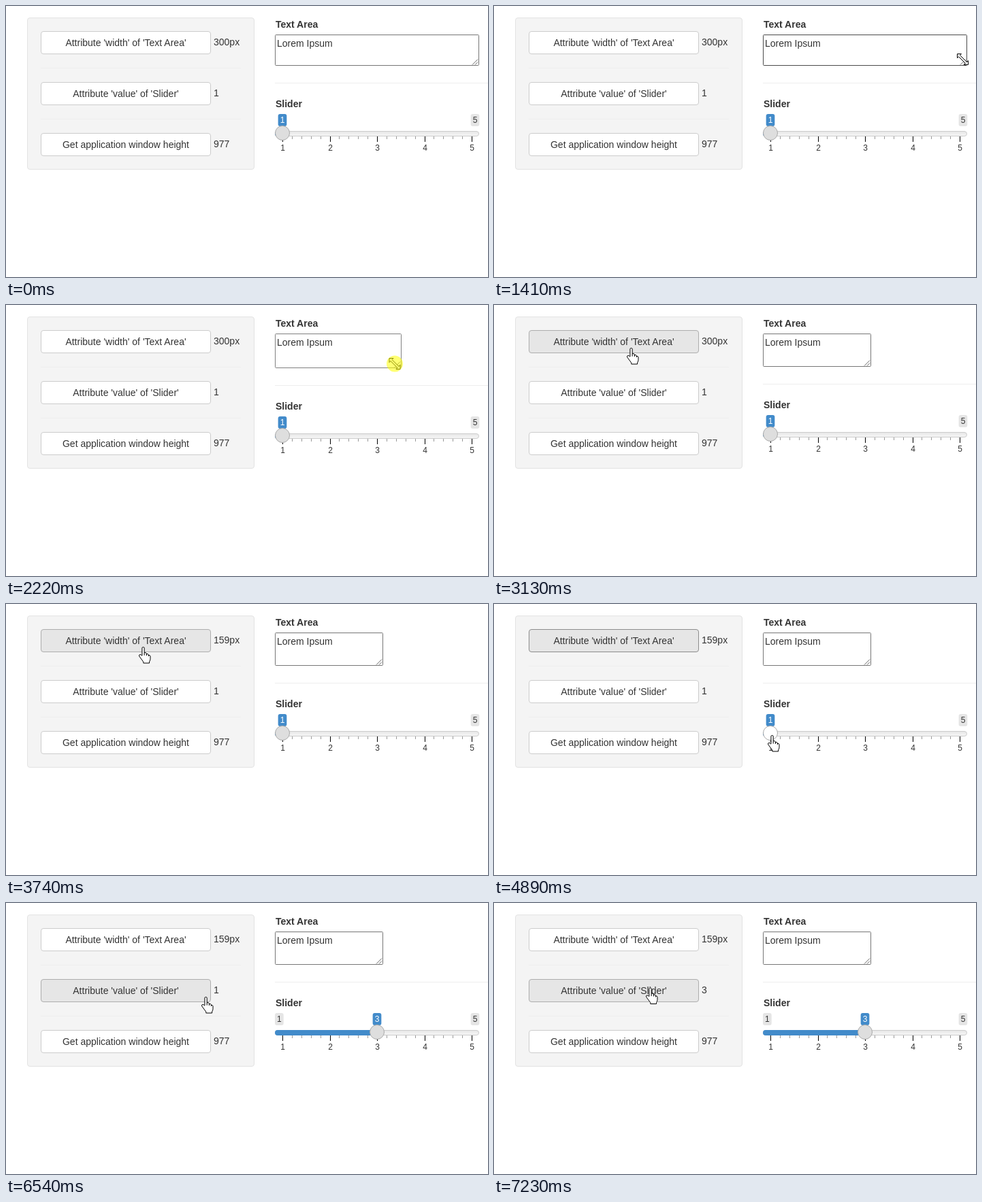
Recreate the animation shown at these times as an HTML page. Size 708x399 px, loop 8 s.

```html
<!DOCTYPE html>
<html lang="en">
<head>
<meta charset="utf-8">
<title>Attribute demo</title>
<style>
html, body { margin: 0; width: 100%; height: 100%; overflow: hidden; background: #fff; }
svg { display: block; width: 708px; height: 399px; }
text { font: 14px "Liberation Sans", Arial, sans-serif; fill: #333; }
.bold { font-weight: bold; }
.small { font-size: 12px; }
.mid { text-anchor: middle; }
.cursor { fill: #fff; stroke: #000; stroke-linejoin: round; }
</style>
</head>
<body>
<svg id="stage" viewBox="0 0 708 399">
  <defs>
    <linearGradient id="track" x1="0" y1="-.5" x2="0" y2="1.5">
      <stop offset="0" stop-color="#dedede"/><stop offset="1" stop-color="#fff"/>
    </linearGradient>
  </defs>
  <rect width="708" height="399" fill="#fff"/>
  <rect x="31.5" y="17.5" width="333" height="223" rx="3.5" fill="#f4f4f4" stroke="#e3e3e3"/>
  <path d="M51 91.5H345M51 166.5H345" stroke="#eee"/>
  <g id="buttons"></g>

  <text class="bold" x="396" y="32">Text Area</text>
  <rect id="area" x="395.5" y="42.5" rx="1" fill="#fff"/>
  <text x="398" y="60">Lorem Ipsum</text>
  <path id="grip" d="M-10 -1.5L-2 -9.5M-6 -1.5L-2 -5.5" stroke="#666"/>

  <g id="lower">
    <path d="M395 113.5H708" stroke="#eee"/>
    <text class="bold" x="396" y="149">Slider</text>
    <g id="grid"></g>
    <rect x="395.5" y="184.5" width="299" height="7" rx="3.5" fill="url(#track)" stroke="#ccc"/>
    <rect id="bar" x="395" y="184" height="8" rx="4" fill="#428bca"/>
    <g id="low"><rect x="395" y="159" width="12.7" height="18" rx="3" fill="#e5e5e5"/>
      <text class="small mid" x="401.4" y="172">1</text></g>
    <rect x="682.6" y="159" width="12.7" height="18" rx="3" fill="#e5e5e5"/>
    <text class="small mid" x="689" y="172">5</text>
    <g id="thumb">
      <rect x="-6.35" y="159" width="12.7" height="18" rx="3" fill="#428bca"/>
      <text id="count" class="small mid" y="172" style="fill:#fff"></text>
      <circle id="knob" cy="187" r="10.5" stroke="#ababab"/>
    </g>
  </g>

  <g id="pointer">
    <path id="arrow" class="cursor" d="M.5 .5V17L4.3 13.4L6.8 18.7L9.2 17.6L6.8 12.4H12Z"/>
    <path id="beam" fill="none" stroke="#000" d="M-3.5 -7.5H-1L0 -6.5L1 -7.5H3.5M0 -6.5V6.5M-3.5 7.5H-1L0 6.5L1 7.5H3.5"/>
    <path id="resize" class="cursor" d="M-8 -8H-2L-4 -6L6 4L8 2V8H2L4 6L-6 -4L-8 -2Z"/>
    <g id="hand" class="cursor">
      <path d="M-1.6 13V2.1a1.65 1.65 0 0 1 3.3 0V8.6q2.6 -.6 3.2 1.4V10.6q2.6 -.8 3 1.2v.6q2.3 -.4 2.6 1.5v4q0 2 -1.4 4v2.1h-8.8v-1.8l-6 -8.2q-1.2 -2.2 1.2 -2.6q1.3 0 2.7 1.7z"/>
      <path d="M1.7 8.6v4M4.9 10v3M7.9 11.8v2.2" fill="none"/>
    </g>
    <circle id="glow" r="12" fill="#ff0" fill-opacity=".55"/>
  </g>
</svg>
<script>
const LOOP = 8000;
const $ = id => document.getElementById(id);
const set = (el, attrs) => { for (const k in attrs) el.setAttribute(k, attrs[k]); };
const show = (id, on) => set($(id), { visibility: on ? "inherit" : "hidden" });
const within = (t, a, b) => t >= a && t < b;

const tops = [37, 112, 187];
const captions = ["Attribute 'width' of 'Text Area'", "Attribute 'value' of 'Slider'", "Get application window height"];
$("buttons").innerHTML = captions.map((s, i) => `
  <rect id="btn${i}" x="51.5" y="${tops[i] + .5}" width="249" height="33" rx="3.5"/>
  <text class="mid" x="176" y="${tops[i] + 22}">${s}</text>
  <text id="val${i}" x="305" y="${tops[i] + 21}"></text>`).join("");

let marks = "";
for (let i = 0; i <= 20; i++) {
  const x = Math.round(406 + i * 13.9) + .5, major = i % 5 === 0;
  marks += `<path d="M${x} 192v${major ? 8 : 4}" stroke="${major ? "#000" : "#999"}"/>`;
  if (major) marks += `<text class="small mid" x="${x + .2}" y="213">${1 + i / 5}</text>`;
}
$("grid").innerHTML = marks;

// start, end, steps, target x, y, optional control point
const legs = [
  [70, 610, 8, 695.5, 71, 706, 170],
  [780, 930, 3, 695.5, 67],
  [1080, 1170, 2, 692, 61],
  [1320, 1410, 2, 688.5, 78.5],
  [1560, 1650, 2, 692, 81.5],
  [1810, 2440, 9, 551, 84.5],
  [2590, 3130, 8, 201.5, 63, 400, -15],
  [4290, 4890, 9, 408.5, 193, 455, 120],
  [5060, 5440, 6, 552, 190],
  [5680, 5760, 2, 552.5, 193],
  [6160, 6620, 7, 229.5, 124.5]
];
const presses = [[1810, 2590], [3600, 3740], [5060, 5680], [7080, 7230]];

const tick = (t, a, b, n) =>
  t < a ? 0 : Math.min(n, Math.floor((t - a) / (b - a) * (n - 1) + .01) + 1);
const smooth = p => p * p * (3 - 2 * p);
const quad = (a, c, b, p) => a * (1 - p) ** 2 + 2 * c * p * (1 - p) + b * p * p;
const easeOut = p => 1 - (1 - p) ** 2;
const sag = e => 3 * e + 2.4 * Math.sin(Math.PI * e ** 4);

function cursorAt(t) {
  let x = 706, y = 273;
  for (const [a, b, n, X, Y, cx = (x + X) / 2, cy = (y + Y) / 2] of legs) {
    if (t < a) break;
    const p = smooth(tick(t, a, b, n) / n);
    [x, y] = [quad(x, cx, X, p), quad(y, cy, Y, p)];
  }
  return [x, y];
}

function draw(t) {
  let [x, y] = cursorAt(t);
  const pressed = presses.some(([a, b]) => within(t, a, b));
  const sizing = within(t, 1810, 2590), sliding = within(t, 5060, 5680);

  // the box trails the pointer slightly while being resized
  const p = Math.max(0, (tick(t, 1810, 2440, 9) - 1) / 8);
  if (sizing) {
    const e = easeOut(p);
    x = 692 - 141 * e;
    y = 81.5 + sag(e);
  }
  const lag = p === 1 ? 1 : easeOut(Math.max(0, p - .06));
  const right = Math.round(695 - 141 * lag), shift = Math.round(sag(lag));
  const bottom = 88 + shift;

  const value = t < 5060 ? 1 : t >= 5440 ? 3 : 1 + Math.round((x - 408.5) / 69.5);
  const knobX = 406 + (value - 1) * 69.5;

  const visible = t >= 70;
  const overArea = visible && x >= 395 && x <= right + 1 && y >= 42 && y <= bottom;
  const overGrip = sizing || overArea && x > right - 16 && y > bottom - 16;
  const overKnob = sliding || Math.hypot(x - knobX, y - 187 - shift) < 11;
  const overBtn = tops.findIndex(top => visible && x >= 51 && x <= 301 && y >= top && y <= top + 34);
  const focus = within(t, 3600, 5060) ? 0 : t >= 7080 ? 1 : -1;

  const values = [t < 3670 ? "300px" : "159px", t < 7155 ? "1" : "3", "977"];
  values.forEach((v, i) => {
    const hover = overBtn === i, down = hover && pressed;
    set($("btn" + i), {
      fill: down ? "#d4d4d4" : hover || focus === i ? "#e6e6e6" : "#fff",
      stroke: down ? "#8c8c8c" : hover ? "#adadad" : focus === i ? "#8c8c8c" : "#ccc"
    });
    $("val" + i).textContent = v;
  });

  set($("area"), {
    width: right - 396, height: bottom - 43,
    stroke: sizing ? "#808080" : overArea ? "#4a4a4a" : "#767676"
  });
  set($("grip"), { transform: `translate(${right} ${bottom})` });
  set($("lower"), { transform: `translate(0 ${shift})` });
  set($("bar"), { width: knobX - 395 });
  set($("thumb"), { transform: `translate(${knobX} 0)` });
  set($("knob"), { fill: overKnob ? "#fff" : "#dedede" });
  $("count").textContent = value;
  show("low", value > 1);

  const kind = overGrip ? "resize" : overKnob || overBtn >= 0 ? "hand" : overArea ? "beam" : "arrow";
  for (const id of ["arrow", "beam", "resize", "hand"]) show(id, id === kind);
  show("glow", pressed);
  show("pointer", visible);
  set($("pointer"), { transform: `translate(${Math.round(x * 2) / 2} ${Math.round(y * 2) / 2})` });
}

const start = performance.now();
function frame() {
  draw((performance.now() - start) % LOOP);
  requestAnimationFrame(frame);
}
draw(0);
requestAnimationFrame(frame);
</script>
</body>
</html>
```
